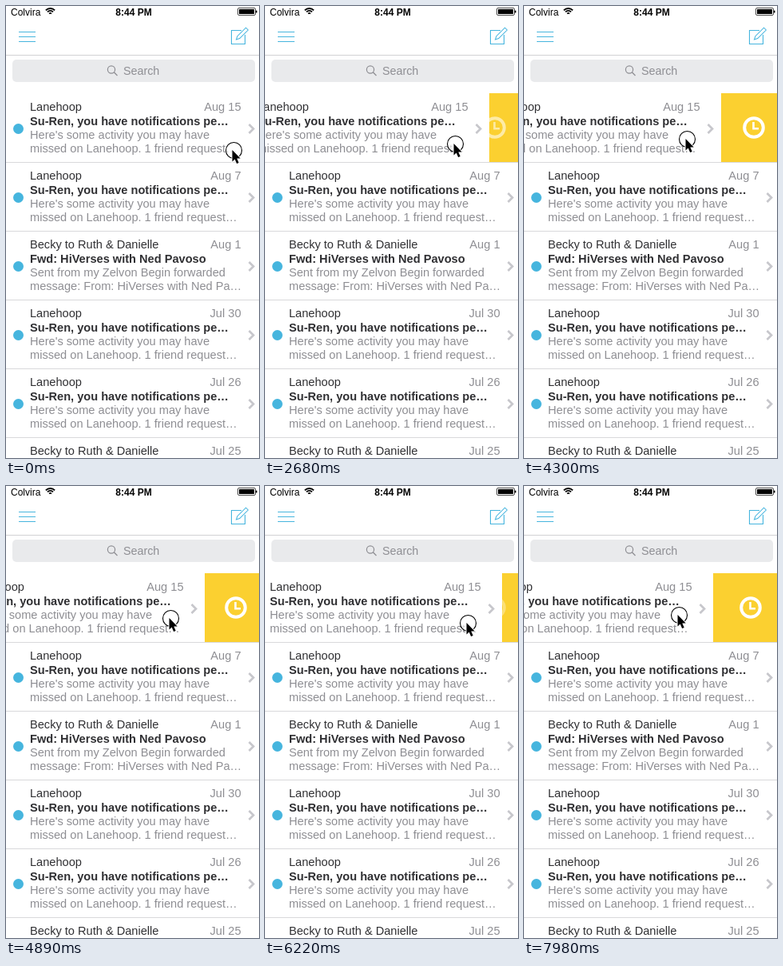
An HTML page with a canvas for the animation above (8000 ms loop, 317 by 565 pixels).

```html
<!DOCTYPE html>
<html lang="en">
<head>
<meta charset="utf-8">
<style>
html, body { margin: 0; width: 100%; height: 100%; overflow: hidden; background: #fff; }
canvas { display: block; width: 317px; height: 565px; }
</style>
</head>
<body>
<canvas id="stage"></canvas>
<script>
const W = 317, H = 565, LOOP = 8000, STEP = 148;
const ROW_TOP = 109, ROW_H = 86;
const BLUE = '#46b5de', GREY = '#8e8e93', DARK = '#303033', YELLOW = '#fbd030';
const FONT = '"Liberation Sans", Arial, sans-serif';

const canvas = document.getElementById('stage');
const ctx = canvas.getContext('2d');
const dpr = window.devicePixelRatio || 1;
canvas.width = W * dpr;
canvas.height = H * dpr;
ctx.scale(dpr, dpr);

const notice = {
  from: 'Lanehoop', title: 'Su-Ren, you have notifications pe…',
  body: ["Here's some activity you may have", 'missed on Lanehoop. 1 friend request…']
};
const forward = {
  from: 'Becky to Ruth & Danielle', title: 'Fwd: HiVerses with Ned Pavoso',
  body: ['Sent from my Zelvon Begin forwarded', 'message: From: HiVerses with Ned Pa…']
};
const dates = ['Aug 15', 'Aug 7', 'Aug 1', 'Jul 30', 'Jul 26', 'Jul 25'];

// Drag turning points: step -> pointer x. The row follows left of GRAB.
const GRAB = 278, START_X = 285;
const drag = [[5, START_X], [10, 263], [29, 204], [34, 206], [37, 233], [45, 267], [48, 268], [54, 194]];

function pointerAt(step) {
  const next = drag.findIndex(([k]) => k >= step);
  let x = START_X;
  if (next > 0) {
    const [k0, x0] = drag[next - 1], [k1, x1] = drag[next];
    x = Math.round(x0 + (x1 - x0) * (step - k0) / (k1 - k0));
  }
  // The hand rises as it pulls left, and drifts up a little over time.
  const y = Math.round(180 - 0.13 * (step + START_X - x));
  return { x, y };
}

function text(str, x, y, color, size = 14.6, weight = 400, align = 'left') {
  ctx.font = `${weight} ${size}px ${FONT}`;
  ctx.fillStyle = color;
  ctx.textAlign = align;
  ctx.fillText(str, x, y);
}

function stroke(color, width) {
  ctx.strokeStyle = color;
  ctx.lineWidth = width;
  ctx.stroke();
}

function fill(color) {
  ctx.fillStyle = color;
  ctx.fill();
}

function path(...points) {
  ctx.beginPath();
  points.forEach(([x, y]) => ctx.lineTo(x, y));
}

function hline(y, color, x0 = 0, x1 = W) {
  path([x0, y], [x1, y]);
  stroke(color, 1);
}

function arc(x, y, r, a = 0, b = Math.PI * 2) {
  ctx.beginPath();
  ctx.arc(x, y, r, a, b);
}

function box(x, y, w, h, r = 0) {
  ctx.beginPath();
  ctx.roundRect(x, y, w, h, r);
}

function drawStatus() {
  text('Colvira', 6, 11.5, '#000', 12);
  text('8:44 PM', 160, 11.5, '#000', 12, 700, 'center');
  for (const r of [8, 5, 2]) {
    arc(55.5, 11, r, -Math.PI * 0.75, -Math.PI * 0.25);
    stroke('#000', 1.8);
  }
  box(290.5, 2.5, 22, 9, 1.5);
  stroke('#000', 0.7);
  box(292, 4, 19, 6, 0.5);
  fill('#000');
  box(313, 5.5, 1.5, 3, 0.5);
  fill('#000');
}

function drawCompose() {
  path([295, 30.5], [282.5, 30.5], [282.5, 47.5], [299.5, 47.5], [299.5, 36]);
  stroke(BLUE, 1.1);
  ctx.save();
  ctx.translate(288.5, 42);
  ctx.rotate(-Math.PI / 4);
  path([0, 0], [4, -2], [19, -2], [19, 2], [4, 2]);
  ctx.closePath();
  stroke(BLUE, 1);
  ctx.restore();
}

function drawHeader() {
  for (let i = 0; i < 3; i++) hline(32.5 + 6 * i, BLUE, 16, 37);
  drawCompose();
  hline(61.5, '#d2d2d4');
  box(8, 67, 304, 28, 5);
  fill('#e9eaec');
  arc(132, 79.5, 4.6);
  stroke(GREY, 1.2);
  path([135.3, 82.8], [139.5, 87]);
  stroke(GREY, 1.3);
  text('Search', 147, 85.5, GREY, 14.3);
}

function drawMail(mail, date, y, dx) {
  ctx.save();
  ctx.translate(dx, y);
  arc(15.5, 44.5, 6.5);
  fill(BLUE);
  text(mail.from, 30, 22, DARK);
  text(date, 294.5, 22, GREY, 14.6, 400, 'right');
  text(mail.title, 30, 39.5, DARK, 14.6, 700);
  mail.body.forEach((s, i) => text(s, 30, 56.5 + 17 * i, GREY));
  path([304.5, 39], [310, 44.5], [304.5, 50]);
  stroke('#c7c7cc', 2.7);
  ctx.restore();
}

function drawAction(dx) {
  const edge = 321 + dx;
  if (edge >= W) return;
  ctx.save();
  box(edge, ROW_TOP, W - edge, ROW_H);
  ctx.clip();
  fill(YELLOW);
  ctx.globalAlpha = Math.min(1, -dx / 70);
  ctx.translate(288 + Math.min(0, dx + 80), 152);
  arc(0, 0, 11.8);
  stroke('#fff', 4);
  path([-0.5, -7], [-0.5, 1.2], [6, 1.2]);
  stroke('#fff', 2.6);
  ctx.restore();
}

function drawPointer({ x, y }) {
  arc(x + 0.5, y + 0.5, 10);
  fill('rgba(255,255,255,0.65)');
  stroke('#000', 1.1);
  ctx.save();
  ctx.translate(x - 1.5, y);
  path([0, 0], [0, 14.5], [3.2, 11.5], [5.6, 17], [8.2, 16], [5.8, 10.6], [10.2, 10.4]);
  ctx.closePath();
  stroke('#fff', 1.8);
  fill('#000');
  ctx.restore();
}

function draw(now) {
  const pointer = pointerAt(Math.floor((now % LOOP + 12) / STEP));
  const dx = Math.min(0, pointer.x - GRAB);
  ctx.fillStyle = '#fff';
  ctx.fillRect(0, 0, W, H);
  drawStatus();
  drawHeader();
  dates.forEach((date, i) => {
    const y = ROW_TOP + ROW_H * i;
    drawMail(i % 3 === 2 ? forward : notice, date, y, i ? 0 : dx);
    hline(y + 86.5, '#d9d9db');
  });
  drawAction(dx);
  drawPointer(pointer);
}

const start = performance.now();
function tick() {
  draw(performance.now() - start);
  requestAnimationFrame(tick);
}
tick();
</script>
</body>
</html>
```
